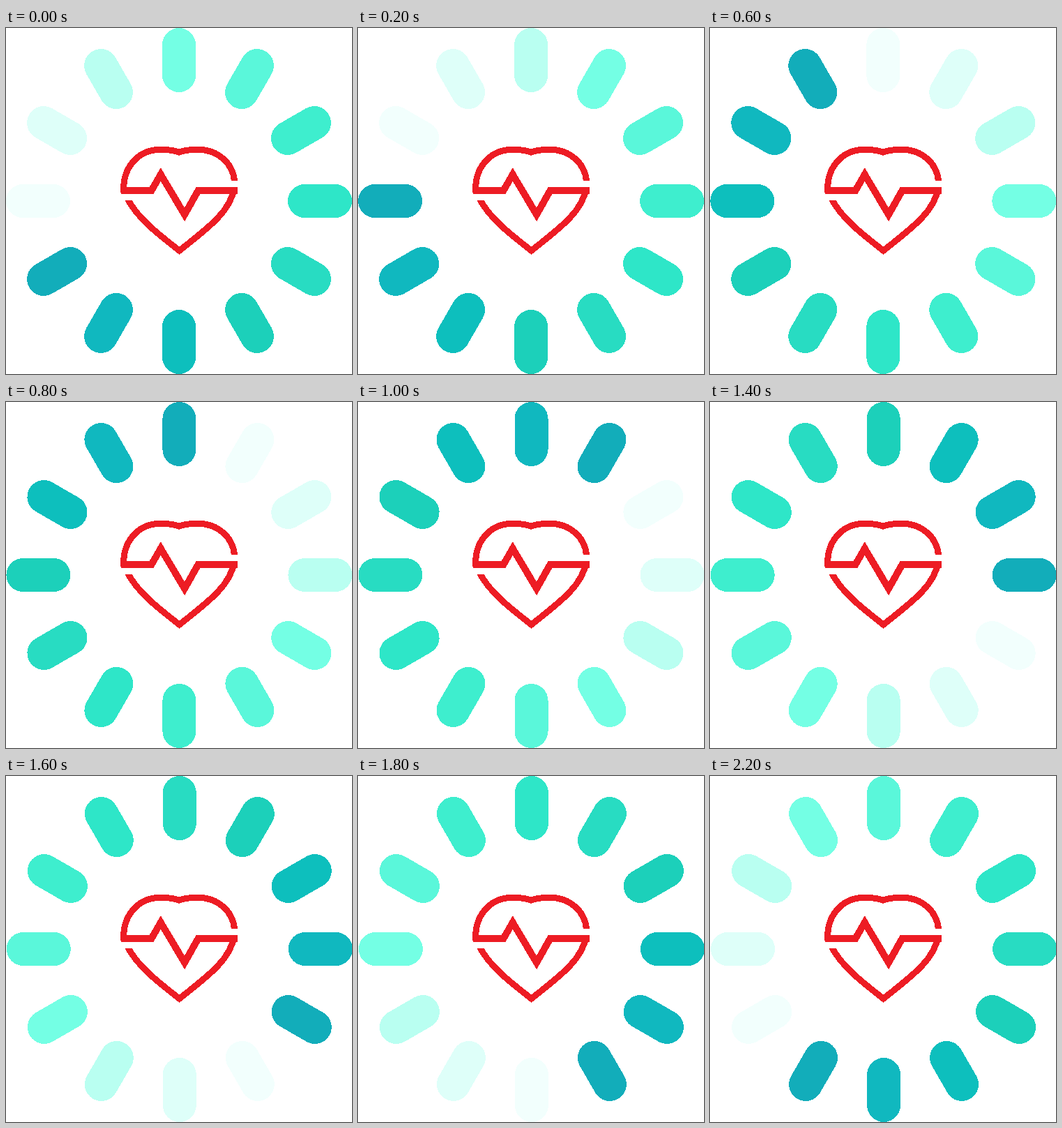
Animation of 496 by 496 pixels, one loop 2.4 s. Source, as an HTML page:

```html
<!DOCTYPE html>
<html lang="en">
<head>
<meta charset="utf-8">
<title>Heartbeat spinner</title>
<style>
  html, body { margin: 0; width: 100%; height: 100%; overflow: hidden; background: #fff; }
  svg { display: block; width: 100vw; height: 100vh; }
</style>
</head>
<body>
<svg viewBox="0 0 496 496" shape-rendering="crispEdges">
  <g id="ring"></g>
  <g fill="none" stroke="#ed1c24" stroke-miterlimit="10">
    <path stroke-width="9" d="M248.5 319.2C222 298 190 275 174.3 245L169 236
      C166 200 190 174.3 221 174.3C231 174.3 240 175 248 178
      C256 175 265 174.3 275 174.3C304 174.3 325 194 327.5 219
      V230C320 264 293 284 248.5 319.2Z"/>
    <path stroke-width="10" d="M165 233H208.5L221.8 210L256 267.5L275.5 233H332"/>
  </g>
  <g fill="#fff">
    <rect x="316" y="219" width="24" height="9"/>
    <rect x="158" y="238" width="27" height="9"/>
  </g>
</svg>
<script>
const STEP_MS = 200;
const COUNT = 12;
// From the leading pill back along the fading tail.
const COLORS = ['#12adba', '#10b8bf', '#0dbfbd', '#1cd0ba', '#28dcc2', '#2ee6c8',
                '#3eeece', '#5af7da', '#74ffe4', '#b9fff1', '#defff9', '#f2fffd'];
const LEAD_START = 8;

const ring = document.getElementById('ring');
const pills = COLORS.map((_, i) => {
  const pill = document.createElementNS('http://www.w3.org/2000/svg', 'rect');
  const attrs = { x: 224, y: 0, width: 48, height: 92, rx: 24, transform: `rotate(${i * 30} 248 248)` };
  for (const [name, value] of Object.entries(attrs)) pill.setAttribute(name, value);
  ring.append(pill);
  return pill;
});

function render(time) {
  const step = Math.floor(time / STEP_MS) % COUNT;
  pills.forEach((pill, i) => {
    pill.setAttribute('fill', COLORS[(LEAD_START + step - i + COUNT) % COUNT]);
  });
  // The ring drifts about one pixel to the right during each turn.
  ring.setAttribute('transform', `translate(${step / 10} 0)`);
}

const start = performance.now();
function tick() {
  render(performance.now() - start);
  requestAnimationFrame(tick);
}
tick();
</script>
</body>
</html>
```
